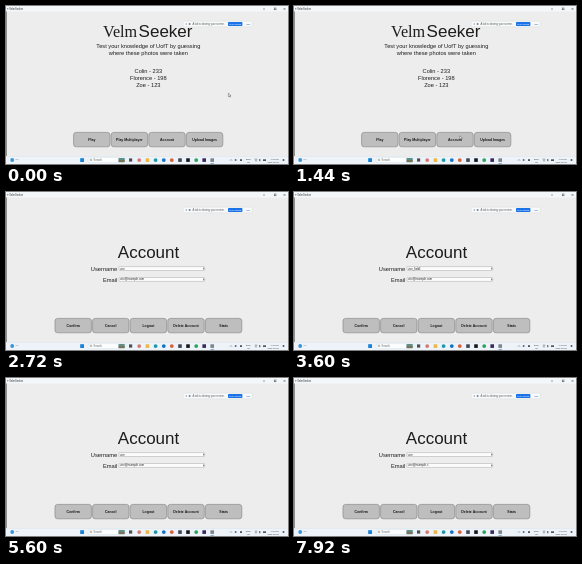
An HTML page with a canvas for the animation above (8 s loop, 282 by 158 pixels).

```html
<!DOCTYPE html>
<html lang="en">
<head>
<meta charset="utf-8">
<title>Account settings</title>
<style>
html, body { margin: 0; width: 100%; height: 100%; overflow: hidden; background: #ededed; }
canvas { display: block; width: 282px; height: 158px; }
</style>
</head>
<body>
<canvas id="stage"></canvas>
<script>
const W = 282, H = 158, LOOP = 8000;
const SANS = '"Liberation Sans", Arial, sans-serif';
const SERIF = '"Liberation Serif", serif';
const canvas = document.getElementById('stage');
const ctx = canvas.getContext('2d');
const dpr = window.devicePixelRatio || 1;
canvas.width = Math.round(W * dpr);
canvas.height = Math.round(H * dpr);
ctx.scale(dpr, dpr);

const HOME_UNTIL = 1840;
const NAME = 'zoe_field', MAIL = 'zoe@example.com';

function text(str, x, y, size, { align = 'left', color = '#1c1c1c', weight = '', face = SANS } = {}) {
  ctx.font = `${weight} ${size}px ${face}`;
  ctx.textAlign = align;
  ctx.fillStyle = color;
  ctx.fillText(str, x, y);
}

function rect(x, y, w, h, color) {
  ctx.fillStyle = color;
  ctx.fillRect(x, y, w, h);
}

function box(x, y, w, h, r, fill, stroke, line = 0.6) {
  ctx.beginPath();
  ctx.roundRect(x, y, w, h, r);
  ctx.fillStyle = fill;
  ctx.fill();
  if (!stroke) return;
  ctx.strokeStyle = stroke;
  ctx.lineWidth = line;
  ctx.stroke();
}

function dot(x, y, r, color) {
  ctx.beginPath();
  ctx.arc(x, y, r, 0, Math.PI * 2);
  ctx.fillStyle = color;
  ctx.fill();
}

function path(points, color, line = 0.5) {
  ctx.beginPath();
  points.forEach(([x, y], i) => i ? ctx.lineTo(x, y) : ctx.moveTo(x, y));
  ctx.strokeStyle = color;
  ctx.lineWidth = line;
  ctx.stroke();
}

function windowFrame() {
  rect(0, 0, W, H, '#ededed');
  rect(0, 0, W, 5.5, '#f4f7fa');
  rect(0, 5.5, 0.8, 144.5, '#777');
  dot(1.7, 2.8, 0.8, '#8a8f98');
  text('VelmSeeker', 3.2, 3.9, 2.6, { color: '#333' });
  path([[257, 3], [259, 3]], '#444');
  ctx.strokeRect(268.2, 2, 1.8, 1.8);
  path([[277.6, 2], [279.4, 3.8]], '#444');
  path([[279.4, 2], [277.6, 3.8]], '#444');
}

function shareBar() {
  box(177.2, 15.2, 69, 5.6, 0.8, '#f9fafb', '#d2d4d8', 0.4);
  path([[180.2, 17], [180.2, 19]], '#555');
  dot(183.6, 18, 1, '#6b7f9d');
  text('A tab is sharing your screen.', 186.4, 18.8, 2.55, { color: '#555' });
  box(222, 15.9, 14.4, 4.2, 0.8, '#1a73e8');
  text('Stop sharing', 229.2, 18.7, 2.2, { align: 'center', color: '#fff' });
  text('Hide', 242, 18.8, 2.3, { align: 'center', color: '#456a9c' });
}

function buttons(left, labels) {
  labels.forEach((label, i) => {
    const x = left + i * 37.6;
    box(x, 126.4, 36.4, 14.4, 2.6, '#bebebe', '#8b8b8b', 0.7);
    text(label, x + 18.2, 134.9, 3.5, { align: 'center', weight: 'bold', color: '#161616' });
  });
}

function home() {
  text('Velm', 97, 31, 16.2, { face: SERIF });
  text('Seeker', 132.6, 31, 17);
  [
    ['Test your knowledge of UofT by guessing', 42],
    ['where these photos were taken', 49],
    ['Colin - 233', 67],
    ['Florence - 198', 74],
    ['Zoe - 123', 81]
  ].forEach(([line, y]) => text(line, 142.3, y, 5.7, { align: 'center' }));
  buttons(67.6, ['Play', 'Play Multiplayer', 'Account', 'Upload Images']);
}

function field(label, value, y, caret) {
  text(label, 111.3, y + 4.3, 5.75, { align: 'right' });
  box(113, y, 85.6, 3.9, 0.6, '#fcfcfc', '#a8a8a8', 0.5);
  rect(197.3, y + 1.1, 0.8, 1.7, '#555');
  text(value, 114.2, y + 2.9, 2.8, { color: '#222' });
  if (caret) rect(114.5 + ctx.measureText(value).width, y + 0.6, 0.4, 2.7, '#222');
}

// Extra letters are typed after the first three, then erased again.
function nameLength(t) {
  const extra = NAME.length - 3;
  if (t < 3360) return 3;
  if (t < 4320) return 3 + Math.min(extra, Math.floor((t - 3360) / 40) + 1);
  return 3 + Math.max(0, extra - Math.floor((t - 4320) / 53) - 1);
}

function mailLength(t) {
  return MAIL.length - (t >= 7040) - (t >= 7280);
}

function account(t) {
  text('Account', 142.5, 66, 17, { align: 'center' });
  field('Username', NAME.slice(0, nameLength(t)), 74.6, t >= 3360 && t < 5440);
  field('Email', MAIL.slice(0, mailLength(t)), 85.5, false);
  buttons(49, ['Confirm', 'Cancel', 'Logout', 'Delete Account', 'Stats']);
}

function taskbar() {
  rect(0, 150, W, 8, '#edf3f8');
  rect(0, 150, W, 0.4, '#d5dde4');
  dot(6.2, 154, 1.9, '#3b93d6');
  rect(9.4, 153, 3, 0.5, '#9aa2aa');
  rect(74.2, 152.2, 3.8, 3.8, '#1683d8');
  box(82, 151.6, 37.4, 5, 2.4, '#fbfdfe', '#d4dbe2', 0.4);
  ctx.beginPath();
  ctx.arc(85, 153.8, 0.9, 0, Math.PI * 2);
  ctx.strokeStyle = '#555';
  ctx.stroke();
  text('Search', 87.6, 155, 2.7, { color: '#666' });
  box(112.4, 152, 6.4, 4.2, 0.8, '#5f8f8a');
  rect(112.8, 154.2, 5.6, 1.6, '#8b6a4e');
  rect(123, 152.4, 3.2, 3.2, '#4b4f55');
  [
    [133.2, '#d9776f'], [149.6, '#1b98a8'], [157.8, '#1473c4'],
    [165.8, '#d9603f'], [190.2, '#27a35a']
  ].forEach(([x, c]) => dot(x, 154.1, 1.9, c));
  [
    [141.4, '#e9b949'], [174, '#3d4654'], [182, '#15171b'],
    [198.2, '#38285e'], [206.2, '#7d858f']
  ].forEach(([x, c]) => rect(x - 1.8, 152.3, 3.6, 3.6, c));
  rect(204.6, 157, 3.2, 0.6, '#3b7fc4');

  path([[224, 154.6], [225, 153.6], [226, 154.6]], '#444');
  dot(229.6, 154.1, 1, '#4b6c92');
  rect(234, 153.2, 2, 1.8, '#555');
  text('ENG', 242.4, 153.7, 2.2, { align: 'center', color: '#333' });
  text('US', 242.4, 156.5, 2.2, { align: 'center', color: '#333' });
  path([[248.6, 153.6], [250, 152.8], [251.4, 153.6]], '#444');
  dot(250, 154.8, 0.6, '#444');
  path([[253.8, 153], [253.8, 155.2]], '#444', 1);
  rect(257, 153.3, 3, 1.7, '#555');
  text('7:42 PM', 272.6, 153.7, 2.2, { align: 'right', color: '#333' });
  text('2024-03-09', 272.6, 156.5, 2.2, { align: 'right', color: '#333' });
  dot(277.5, 154, 1, '#555');
}

const ease = p => p * p * (3 - 2 * p);

function glide(t, start, end, a, b) {
  const p = ease(Math.min(1, Math.max(0, (t - start) / (end - start))));
  return [a[0] + (b[0] - a[0]) * p, a[1] + (b[1] - a[1]) * p];
}

function pointer(t) {
  if (t >= 2640) return;
  const [x, y] = t < 1920
    ? glide(t, 80, 1360, [222.4, 87.2], [165.8, 129.8])
    : glide(t, 1920, 2640, [165.8, 129.8], [128, 76]);
  ctx.beginPath();
  [[0, 0], [0, 3.5], [0.9, 2.8], [1.5, 4], [2.1, 3.7], [1.5, 2.5], [2.6, 2.4]]
    .forEach(([dx, dy]) => ctx.lineTo(x + dx, y + dy));
  ctx.closePath();
  ctx.fillStyle = '#fff';
  ctx.fill();
  ctx.strokeStyle = '#333';
  ctx.lineWidth = 0.4;
  ctx.stroke();
}

function draw(now) {
  const t = now % LOOP;
  windowFrame();
  if (t < HOME_UNTIL) home();
  else account(t);
  shareBar();
  taskbar();
  pointer(t);
}

const begin = performance.now();
function tick() {
  draw(performance.now() - begin);
  requestAnimationFrame(tick);
}
tick();
</script>
</body>
</html>
```
